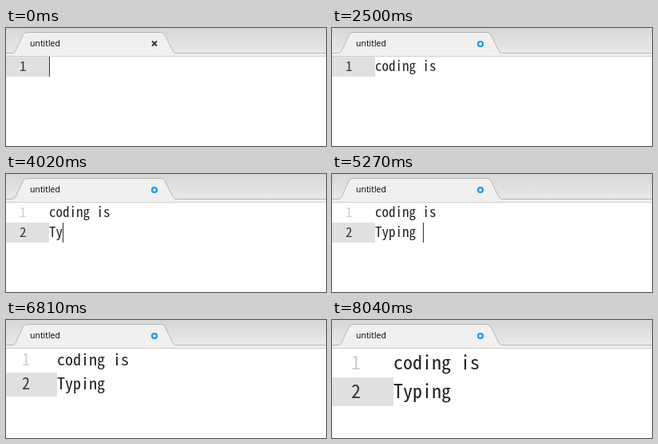
These frames come from a looping animation (401x148 px, 8290 ms). An HTML page:

```html
<!DOCTYPE html>
<html lang="en">
<head>
<meta charset="utf-8">
<title>Editor</title>
<style>
  html, body { margin: 0; width: 100%; height: 100%; overflow: hidden; background: #fff; }
  svg { display: block; }
  .code { font-family: "Noto Sans Mono CJK JP", "Noto Sans Mono CJK SC", "Noto Sans Mono", monospace; fill: #222; white-space: pre; }
  .label { font: 10.5px "Open Sans", "Noto Sans", sans-serif; fill: #000; }
</style>
</head>
<body>
<svg width="401" height="148" viewBox="0 0 401 148">
  <defs>
    <linearGradient id="bar" x2="0" y2="1">
      <stop stop-color="#d7d7d7"/><stop offset="1" stop-color="#e9e9e9"/>
    </linearGradient>
  </defs>
  <rect width="401" height="32" fill="url(#bar)"/>
  <path d="M-1 36V31.5H7Q10.5 31.5 12 28.5L21.5 8.5Q23 5.5 26 5.5H194.500Q197.500 5.500 199 8.500L209 28.500Q210.500 31.500 213.500 31.500H402V36Z" fill="#f0f0f0" stroke="#b4b4b4"/>
  <rect y="35" width="401" height="1" fill="#d0d0d0"/>
  <rect y="36" width="401" height="112" fill="#fff"/>
  <text class="label" x="30" y="23">untitled</text>
  <path id="close" d="M183 16.500l6 6m0-6l-6 6" stroke="#333" stroke-width="1.800"/>
  <circle id="dirty" cx="186" cy="20" r="3" fill="none" stroke="#0f99ff" stroke-width="2.200"/>
  <rect id="gutter" fill="#e0e0e0"/>
  <g class="code" id="code">
    <text id="num0">1</text><text id="num1">2</text>
    <text id="line0"></text><text id="line1"></text>
  </g>
  <rect id="caret" width="1" fill="#333"/>
</svg>
<script>
const $ = id => document.getElementById(id);
const LOOP = 8290, TICK = LOOP / 33, LEAD = 36, TOP = 36;

// What is typed on each tick; an empty entry is a pause
const KEYS = "||c|o|d|i|n|g |i|s |||\n||T||y|p|i|ng|| ".split("|");
const CARET_OFF = [1, 10, 11, 23, 26, 27, 29, 30, 32];
const DIRTY_TICK = 5, ZOOM_TICK = 26;

function set(id, attrs) {
  for (const k in attrs) $(id).setAttribute(k, attrs[k]);
}

function draw(t) {
  const tick = Math.min(32, Math.floor((t + LEAD) / TICK));
  const lines = KEYS.slice(0, tick + 1).join("").split("\n");
  const row = lines.length - 1;

  const size = tick < ZOOM_TICK ? 17 : Math.min(24, 18 + 2 * (tick - ZOOM_TICK));
  const cell = size / 2, height = Math.floor(size * 1.5);
  const left = Math.floor(cell * 6.5 - 1), y = TOP + row * height;

  set("code", { "font-size": size });
  for (const i of [0, 1]) {
    const base = TOP + i * height + Math.floor(height * 0.725);
    const opacity = i > row ? 0 : i < row ? 0.22 : 0.88;
    set("num" + i, { x: cell * 2, y: base, opacity });
    set("line" + i, { x: left, y: base });
    $("line" + i).textContent = lines[i] ?? "";
  }
  set("gutter", { y, width: left, height });
  set("caret", {
    x: Math.round(left + lines[row].length * cell), y, height,
    opacity: +!CARET_OFF.includes(tick)
  });
  set("dirty", { opacity: +(tick >= DIRTY_TICK) });
  set("close", { opacity: +(tick < DIRTY_TICK) });
}

const start = performance.now();
function frame() {
  draw((performance.now() - start) % LOOP);
  requestAnimationFrame(frame);
}
draw(0);
requestAnimationFrame(frame);
</script>
</body>
</html>
```
